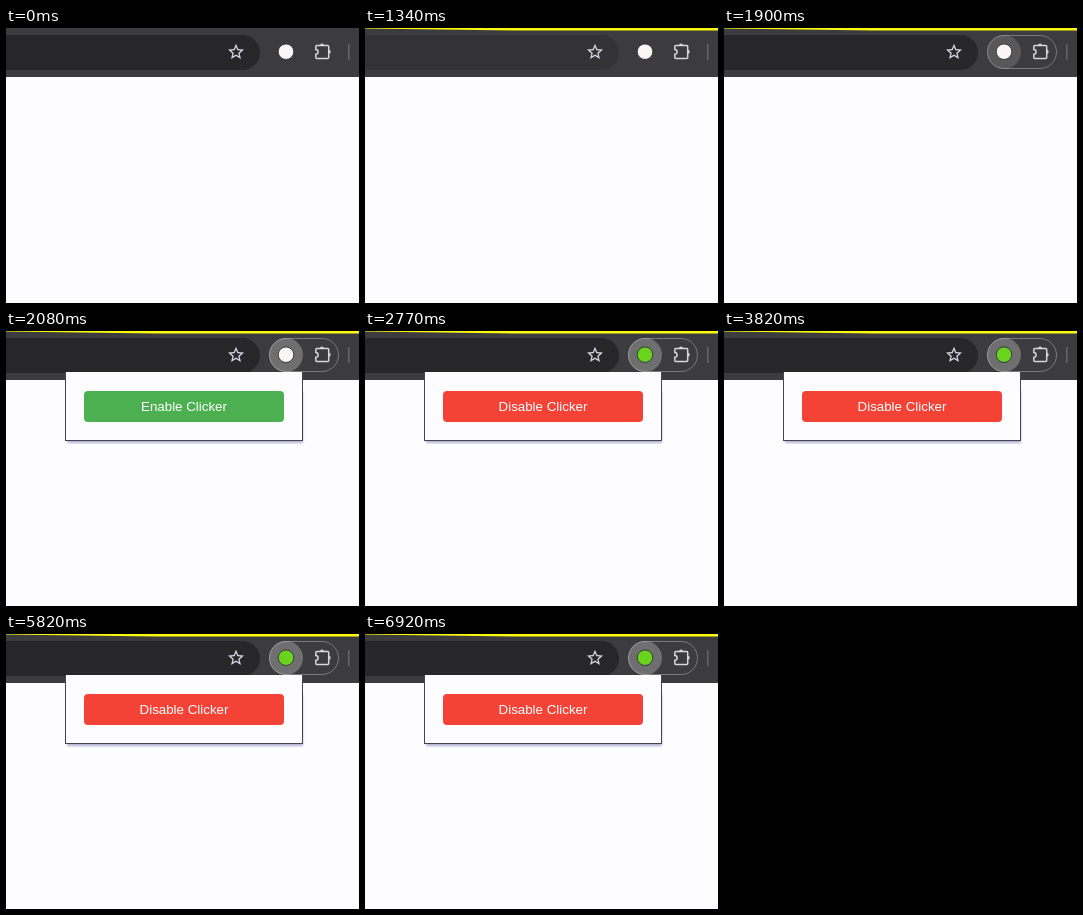
Write an HTML page that moves like this. It is 353 by 275 pixels and loops after 9.34 s.

```html
<!DOCTYPE html>
<html lang="en">
<head>
<meta charset="utf-8">
<title>Clicker toggle</title>
<style>
  html, body { margin: 0; width: 100%; height: 100%; overflow: hidden; background: #fdfdff; }
  svg { display: block; width: 353px; height: 275px; }
  text { font: 13.333px Arial, "Liberation Sans", sans-serif; fill: #fff; text-anchor: middle; }
</style>
</head>
<body>
<svg viewBox="0 0 353 275">
  <defs>
    <filter id="soft" x="-10%" y="-10%" width="120%" height="130%"><feGaussianBlur stdDeviation="1.2"/></filter>
  </defs>
  <rect width="353" height="49" fill="#3c3c3e"/>
  <path id="topLine" d="M0 0H353V2.6H150L0 .6z" fill="#fbf90c"/>
  <rect id="omnibox" x="-40" y="7" width="294" height="35" rx="17.5"/>
  <path transform="translate(220.4 14.2) scale(.8)" fill="#d6d6e4"
    d="M22 9.24l-7.19-.62L12 2 9.19 8.63 2 9.24l5.46 4.73L5.82 21 12 17.27 18.18 21l-1.63-7.03zM12 15.4l-3.76 2.27 1-4.28-3.32-2.88 4.38-.38L12 6.1l1.71 4.04 4.38.38-3.32 2.88 1 4.28z"/>

  <rect id="pill" x="263.5" y="7.5" width="69" height="33" rx="16.5" fill="none" stroke="#77797d"/>
  <circle id="hover" cx="280" cy="24" r="17" fill="#fff"/>
  <circle id="badge" cx="280" cy="23.7" r="7.8" stroke="#38383c"/>
  <g id="puzzle" fill="#d6d6dc">
    <path fill="none" stroke="#d6d6dc" stroke-width="1.5"
      d="M310.8 17.5H321.7a1 1 0 0 1 1 1V29.5a1 1 0 0 1-1 1H310.8a1 1 0 0 1-1-1V26.2a2.3 2.3 0 0 0 0-4.6V18.5a1 1 0 0 1 1-1z"/>
    <path d="M314 17.5a2 2 0 0 1 4 0zM322.7 21.8a2 2 0 0 1 0 4z"/>
  </g>
  <rect x="342" y="16" width="1.5" height="16" fill="#66666a"/>

  <g id="popup">
    <rect x="61" y="60" width="236" height="52" fill="#9c98c4" opacity=".75" filter="url(#soft)"/>
    <rect x="59" y="41" width="238" height="69" fill="#44444a"/>
    <rect x="60" y="41" width="236" height="68" fill="#fdfdff"/>
    <rect id="button" x="78" y="60" width="200" height="31" rx="4"/>
    <text id="label" x="178" y="80"></text>
  </g>
</svg>
<script>
const LOOP = 9340;
const TOGGLES = [2700, 3970, 5570];
const ICON_DELAY = 35;
const $ = id => document.getElementById(id);
const set = (id, name, value) => $(id).setAttribute(name, value);

// Smooth 0..1 ramp between two times
const ramp = (t, from, to) => {
  const p = Math.min(1, Math.max(0, (t - from) / (to - from)));
  return p * p * (3 - 2 * p);
};
const isEnabled = t => TOGGLES.filter(at => t >= at).length % 2 === 1;

function draw(t) {
  const omniHover = ramp(t, 290, 350) - ramp(t, 1350, 1500);
  const shade = 39 + 12 * omniHover;
  set('omnibox', 'fill', `rgb(${shade},${shade},${shade + 2})`);
  set('topLine', 'opacity', t < 30 ? 0 : 1);
  set('pill', 'opacity', ramp(t, 1350, 1560));
  set('hover', 'opacity', .09 * ramp(t, 1400, 1640) + .17 * ramp(t, 1820, 2040));
  set('popup', 'visibility', t < 1980 ? 'hidden' : 'visible');

  const on = isEnabled(t);
  set('button', 'fill', on ? '#f44336' : '#4caf50');
  $('label').textContent = on ? 'Disable Clicker' : 'Enable Clicker';
  set('badge', 'fill', isEnabled(t - ICON_DELAY) ? '#68d41e' : '#fbf6f6');
}

const start = performance.now();
function tick() {
  draw((performance.now() - start) % LOOP);
  requestAnimationFrame(tick);
}
tick();
</script>
</body>
</html>
```
